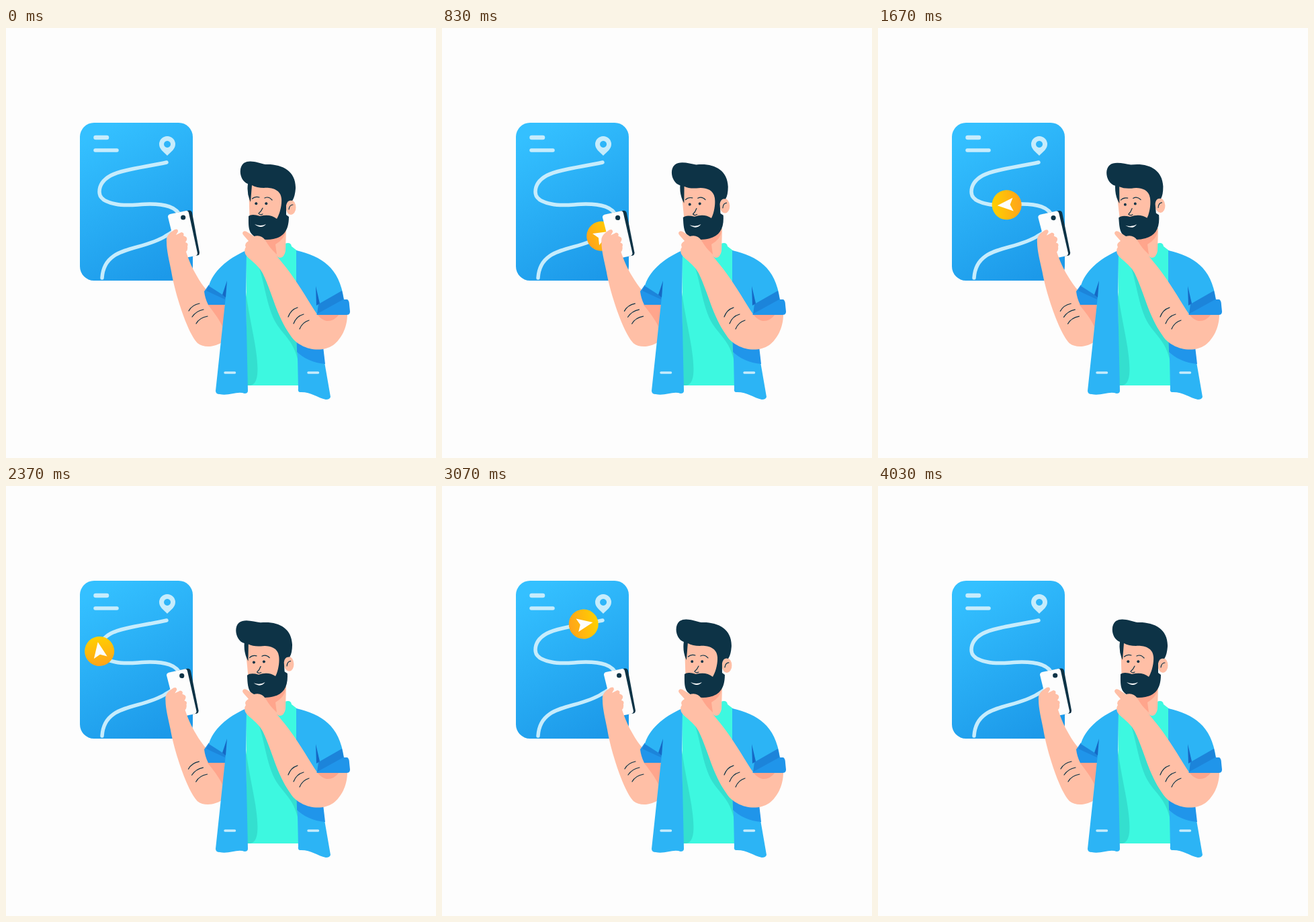
Animation, 640 px wide and 640 px high, one loop 4060 ms. Source, as an HTML page:

```html
<!DOCTYPE html>
<html lang="en">
<head>
<meta charset="utf-8">
<style>
html, body { margin: 0; width: 100%; height: 100%; overflow: hidden; background: #fdfdfd; }
svg { display: block; width: 100vw; height: 100vh; }
.line { fill: none; stroke-linecap: round; stroke-linejoin: round; }
.pale { stroke: #c6ecfc; }
.ink { stroke: #0d3346; stroke-width: 1.2; }
.hair { fill: #0d3346; }
.skin { fill: #ffbfa6; }
.shade { fill: #ffa58c; }
.blue { fill: #2cb4f5; }
.cuff { fill: #2095ea; }
.fold { fill: #1c84da; }
.slit { fill: #1668c4; }
</style>
</head>
<body>
<svg viewBox="0 0 640 640">
  <defs>
    <linearGradient id="sky" x1=".3" y1="0" x2=".7" y2="1">
      <stop offset="0" stop-color="#34c0ff"/><stop offset="1" stop-color="#1c99e9"/>
    </linearGradient>
    <linearGradient id="gold">
      <stop offset="0" stop-color="#ffa31a"/><stop offset="1" stop-color="#ffd000"/>
    </linearGradient>
  </defs>

  <!-- map -->
  <rect x="110" y="141" width="168" height="235" rx="21" fill="url(#sky)"/>
  <path class="line pale" stroke-width="6.5" d="M133.500 163H150"/>
  <path class="line pale" stroke-width="5.500" d="M133 182H165"/>
  <path fill="#c6ecfc" fill-rule="evenodd" d="M240 190C234 184 228 180 228 173A12 12 0 0 1 252 173C252 180 246 184 240 190ZM240 168a5 5 0 1 0 .1 0Z"/>
  <path id="road" class="line pale" stroke-width="5.500" d="M143 372C146 323 200 333 237 310C253 301 263 293 259 280C254 266 237 262 214 262C196 262 181 266 163 262C147 259 139 253 139 244C139 232 146 225 156 219.500C172 211 207 207 239 200"/>

  <g id="marker">
    <circle r="22" fill="url(#gold)"/>
    <path fill="#fdfdfd" d="M14 0L-9.500 10L-5 0L-9.500 -10Z"/>
  </g>

  <!-- raised arm with phone -->
  <g id="arm">
    <path class="hair" d="M250 276L272 271.500Q276 271 277 275L288 334Q288 338 285 338.500L266 341Z"/>
    <path fill="#fdfdfd" d="M244 277L268 272Q271 271.500 272 275L285 335Q285 338 282 339L262 343Q256 343 255 338L241 281Q241 278 244 277Z"/>
    <circle class="hair" cx="263.700" cy="282" r="3.600"/>
    <path class="skin" d="M239 318C238 308 245 304 251 300Q256 298 256 303L253 308L261 304Q266 305 264 309L268 311Q271 314 267 319Q272 320 270 325Q271 330 268 333C273 348 277 357 284 369C293 385 304 399 326 414L324 466C312 475 295 477 285 469C269 452 251 393 246 362C243 346 239 332 239 318Z"/>
    <path class="shade" d="M300 411H327L323 446C318 434 309 423 300 411Z"/>
    <path class="line ink" d="M272 421Q277 412 288 410M277 430Q283 421 294 419M283 440Q288 431 300 429"/>
  </g>

  <!-- shirt and neck -->
  <path fill="#3df8e0" d="M357 335L385 322L415 321Q424 318 425 325L434 332L437 532H359Z"/>
  <path fill="#34dfcf" d="M357 393C363 440 377 486 374 516Q372 532 362 532H358Z"/>
  <path fill="#34dfcf" d="M374 350C384 370 387 416 403 441C414 458 429 467 435 497L440 450Z"/>
  <path class="skin" d="M380 312L417 298L416 332Q414 342 407 342Q402 340 398 334L380 330Z"/>
  <path class="shade" d="M380 312L416 302Q415 314 401 322L403 337L394 328L380 326Z"/>

  <!-- jacket -->
  <path class="cuff" d="M302 382L328 398L327 412H301Q296 402 295 392Z"/>
  <path class="fold" d="M302 383L327 398L326 404L298 391Z"/>
  <path class="blue" d="M358 331C329 343 307 364 302 384L327 400L312 540Q312 545 318 545C332 548 344 540 355 544Q360 544 360 540L357 398Z"/>
  <path class="slit" d="M329 376L322 397L327 401Z"/>
  <path class="blue" d="M432 331C470 340 496 356 503 404L463 426L471 480L483 549Q482 553 476 553C463 550 453 541 437 542Q434 541 435 537L434 490L432 465Z"/>
  <path class="cuff" d="M433 468L472 474L475 500C458 499 442 491 433 482Z"/>
  <path class="fold" d="M465 411L500 391L503 406L463 426Z"/>
  <path class="slit" d="M461 384L467 410L462 413Z"/>
  <path class="line pale" stroke-width="3.500" d="M326 513H340.500M450 513H464.500"/>

  <!-- head -->
  <g id="head">
    <path class="skin" d="M361 230H412L418 262L412 300H363Z"/>
    <ellipse class="skin" cx="424" cy="267" rx="7.500" ry="11"/>
    <path class="hair" d="M360 232C348 228 345 208 354 201C363 195 376 201 386 203C411 202 432 213 431 239Q430 252 426 257Q419 255 417 264V278L421 281C421 300 414 311 398 314C387 316 374 315 367 308C360 302 361 291 361 280Q366 276 378 280Q393 276 403 284C407 278 411 264 410 254C409 240 394 237 384 238Q373 238 366 234L364 259Q358 247 360 232Z"/>
    <path fill="#fdfdfd" d="M370 292Q379 296 387 292Q380 300 370 292Z"/>
    <circle class="hair" cx="372.300" cy="261.300" r="2"/>
    <circle class="hair" cx="387.300" cy="261.300" r="2"/>
    <path class="line ink" d="M366.500 254Q371 250 377 252M385 253Q391 250 396 256M382 268Q380 273 376 276Q378 279 382 277M421 270Q422 263 427 263"/>
  </g>

  <!-- arm at the chin -->
  <path class="skin" d="M352 305Q353 301 358 303L369 310Q380 307 386 316C397 334 413 350 424 366C440 388 451 408 463 426H508C508 446 499 463 487 472C466 486 434 476 423 457C402 427 397 396 382 365C375 351 360 344 356 336Q354 330 357 326Q354 321 361 317L354 309Q352 307 352 305Z"/>
  <path class="shade" d="M463 426H496Q488 437 477 436Q469 434 463 426Z"/>
  <path class="cuff" d="M462 426L502 404H508Q511 406 511 412L512 422Q512 427 507 427H463Z"/>
  <path class="line ink" d="M420 430Q424 419 434 416M428 440Q432 429 443 426M437 448Q441 438 451 435"/>
</svg>
<script>
const LOOP = 4060;
const el = id => document.getElementById(id);
const road = el('road'), roadLength = road.getTotalLength();
const progress = (t, from, to) => Math.min(1, Math.max(0, (t - from) / (to - from)));
const smooth = x => x * x * (3 - 2 * x);
const cubic = x => x < .5 ? 4 * x ** 3 : 1 - 4 * (1 - x) ** 3;

// time, x, y of the places the marker passes
const stops = [[60, 143, 372], [830, 236, 308], [1670, 192, 264],
  [2370, 139, 246], [2730, 154, 220], [3350, 239, 200]]
  .map(([time, x, y]) => ({ time, at: nearest(x, y) }));

// speed at each stop: at rest at both ends, else from its neighbours
stops.forEach((stop, i) => {
  const a = stops[i - 1], b = stops[i + 1];
  stop.speed = a && b ? (b.at - a.at) / (b.time - a.time) : 0;
});

function nearest(x, y) {
  let best = 0, least = Infinity;
  for (let s = 0; s <= roadLength; s += .5) {
    const p = road.getPointAtLength(s), d = Math.hypot(p.x - x, p.y - y);
    if (d < least) { least = d; best = s; }
  }
  return best;
}

function travelled(t) {
  let i = 1;
  while (i < stops.length - 1 && t > stops[i].time) i++;
  const a = stops[i - 1], b = stops[i];
  const u = progress(t, a.time, b.time), v = 1 - u, span = b.time - a.time;
  return a.at + (b.at - a.at) * smooth(u) + span * u * v * (a.speed * v - b.speed * u);
}

function draw(now) {
  const t = now % LOOP;
  const look = cubic(progress(t, 0, 1320)) - cubic(progress(t, 1720, 3370));
  el('head').setAttribute('transform', `rotate(${-5 * look} 388 313)`);
  el('arm').setAttribute('transform', `rotate(${-.8 * look} 303 470)`);

  const s = travelled(t), p = road.getPointAtLength(s);
  const a = road.getPointAtLength(Math.max(0, s - 6));
  const b = road.getPointAtLength(Math.min(roadLength, s + 6));
  const turn = Math.atan2(b.y - a.y, b.x - a.x) * 180 / Math.PI;
  const size = smooth(progress(t, 20, 320)) + .25 * smooth(progress(t, 3300, 3650))
    - 1.25 * smooth(progress(t, 3700, 4010));
  el('marker').setAttribute('transform',
    `translate(${p.x} ${p.y}) rotate(${turn}) scale(${size})`);
}

const start = performance.now();
function tick() {
  draw(performance.now() - start);
  requestAnimationFrame(tick);
}
tick();
</script>
</body>
</html>
```
